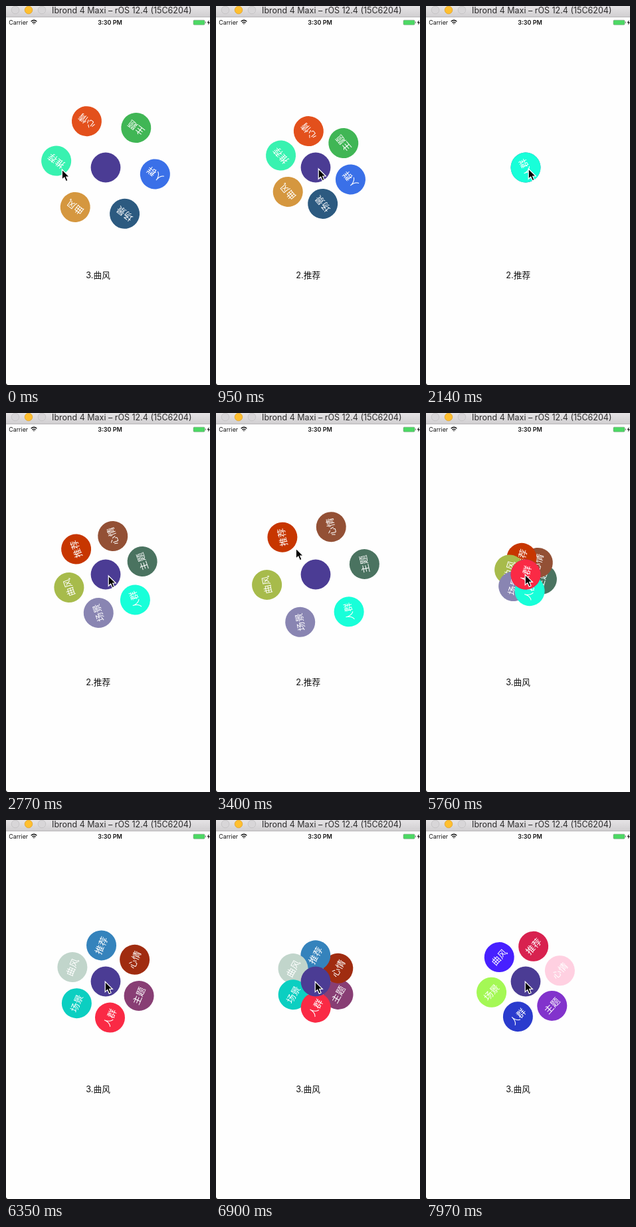
Write an HTML page that moves like this. It is 307 px wide and 568 px high and loops after 8000 ms.

```html
<!DOCTYPE html>
<html lang="zh">
<head>
<meta charset="utf-8">
<title>Orbit menu</title>
<style>
  html, body { margin: 0; width: 100%; height: 100%; overflow: hidden; background: #fefefe; }
  svg { display: block; width: 307px; height: 568px; }
  text { font-family: Inter, "Noto Sans CJK SC", "Noto Sans CJK", sans-serif; }
  .item text { font: 300 13.6px "Noto Sans CJK SC", "Noto Sans CJK", sans-serif; fill: #fff; text-anchor: middle; }
</style>
</head>
<body>
<svg viewBox="0 0 307 568">
  <defs>
    <linearGradient id="bar" x2="0" y2="1">
      <stop offset="0" stop-color="#e5e3e5"/>
      <stop offset="1" stop-color="#d1cfd1"/>
    </linearGradient>
  </defs>
  <rect width="307" height="568" fill="#fefefe"/>

  <rect width="307" height="16" fill="url(#bar)"/>
  <rect y="16" width="307" height="1" fill="#b9b7b9"/>
  <g fill="#d8d6d8" stroke="#c2c0c2" stroke-width=".8">
    <circle cx="14" cy="6" r="5.8"/>
    <circle cx="34" cy="6" r="5.8" fill="#ffbf2f" stroke="#e0a32c"/>
    <circle cx="54" cy="6" r="5.8"/>
  </g>
  <text x="174.3" y="11" font-size="12.5" text-anchor="middle" fill="#2c2b2c">Ibrond 4 Maxi – rOS 12.4 (15C6204)</text>

  <text x="4.3" y="28" font-size="8.8" fill="#111">Carrier</text>
  <g fill="none" stroke="#111" stroke-width="1.3">
    <path d="M37.6 23.2Q42 19.4 46.4 23.2M39.4 25.2Q42 23 44.6 25.2"/>
    <path d="M40.8 26.2L42 27.6 43.2 26.2Q42 25.3 40.8 26.2Z" fill="#111" stroke="none"/>
  </g>
  <text x="156.6" y="28" font-size="9" font-weight="600" text-anchor="middle" fill="#111">3:30 PM</text>
  <rect x="282" y="21.2" width="17" height="7" rx="1.2" fill="#4cd964" stroke="#7d8a7f" stroke-width=".5"/>
  <rect x="299.7" y="23.3" width="1.1" height="2.8" rx=".5" fill="#777"/>
  <path d="M305.6 21L302.6 25.2H304.6L303.9 28.4 307 24.2H305Z" fill="#111"/>

  <g transform="translate(150 242)">
    <circle id="hub" r="22.4" fill="#4b3c94"/>
  </g>
  <text id="label" x="120.3" y="408.3" font-size="12.7" fill="#111"></text>
  <path d="M0 565Q.3 567.6 2.6 568H0Z" fill="#111"/>
  <path id="cursor" d="M0 0V15.3L3.5 12.1 6 17.8 8.8 16.6 6.4 11H11.1Z" stroke="#fff" stroke-width="1.2"/>
</svg>
<script>
const LOOP = 8000, MOVE = 950, RADIUS = 75;
const NAMES = ['主题', '心情', '推荐', '曲风', '场景', '人群'];
const SETS = [
  { open: -2000, close: 615, colors: ['#40b655', '#e3501c', '#38f2b0', '#d5973f', '#2c5a80', '#3a70e8'] },
  { open: 2130, close: 5195, colors: ['#4a7360', '#935035', '#c73600', '#a7bb4b', '#8985b2', '#18ffd9'] },
  { open: 5745, close: 6438, colors: ['#883e74', '#a02c10', '#3583bc', '#c1d5cb', '#0bcfc1', '#fa2a45'] },
  { open: 7370, close: 9000, colors: ['#8233cc', '#ffd0e1', '#d8214f', '#4720ff', '#a4f855', '#2a3bcd'] }
];
// time, x, y of the pointer tip
const POINTER = [
  [0, 84.3, 245], [130, 84.3, 245], [520, 154.2, 244], [2950, 154.2, 244], [3400, 120.3, 203],
  [3900, 81.1, 237.3], [4850, 81.1, 237.3], [5130, 149.2, 242.3], [LOOP, 149.2, 242.3]
];

const byId = id => document.getElementById(id);
const hub = byId('hub'), label = byId('label'), cursor = byId('cursor');
const clamp = x => Math.min(1, Math.max(0, x));

function add(parent, tag, attrs) {
  const el = document.createElementNS('http://www.w3.org/2000/svg', tag);
  for (const key in attrs) el.setAttribute(key, attrs[key]);
  return parent.appendChild(el);
}

// cubic-bezier(.42, 0, .58, 1)
function easeInOut(x) {
  if (x <= 0 || x >= 1) return clamp(x);
  let lo = 0, hi = 1, s = .5;
  for (let i = 0; i < 20; i++) {
    s = (lo + hi) / 2;
    const at = 1.26 * (1 - s) ** 2 * s + 1.74 * (1 - s) * s * s + s ** 3;
    if (at < x) lo = s; else hi = s;
  }
  return s * s * (3 - 2 * s);
}

for (const set of SETS) {
  set.group = add(hub.parentNode, 'g', {});
  set.items = set.colors.map((fill, i) => {
    const item = add(set.group, 'g', { class: 'item' });
    add(item, 'circle', { r: 22.5, fill });
    add(item, 'text', { y: 5.1 }).textContent = NAMES[i];
    return item;
  });
}

function drawSet(set, t, turn) {
  const visible = t >= set.open && t < set.close + MOVE;
  set.group.style.display = visible ? '' : 'none';
  if (!visible) return;
  // opening sets lie above the hub, closing ones below it
  const closing = t >= set.close;
  if (set.closing !== closing) {
    set.closing = closing;
    if (closing) hub.before(set.group); else hub.after(set.group);
  }
  const spread = easeInOut((t - set.open) / MOVE) - easeInOut((t - set.close) / MOVE);
  const stacked = spread < .004;
  set.items.forEach((item, i) => {
    const angle = (turn + 90 - 60 * i) * Math.PI / 180;
    const x = RADIUS * spread * Math.cos(angle), y = RADIUS * spread * Math.sin(angle);
    item.setAttribute('transform', `translate(${x} ${y}) rotate(${turn})`);
    // covered items would only tint the rim of the top one
    item.style.display = stacked && i < NAMES.length - 1 ? 'none' : '';
  });
}

function drawPointer(t) {
  const next = POINTER.findIndex(p => p[0] > t);
  const [t0, x0, y0] = POINTER[next - 1], [t1, x1, y1] = POINTER[next];
  const k = easeInOut((t - t0) / (t1 - t0));
  cursor.setAttribute('transform', `translate(${x0 + (x1 - x0) * k} ${y0 + (y1 - y0) * k})`);
}

function draw(now) {
  const t = now % LOOP, turn = -142.4 + .0119 * t;
  for (const set of SETS) drawSet(set, t, turn);
  drawPointer(t);
  const picked = t >= 90 && t < 4400 ? 2 : 3;
  label.textContent = `${picked}.${NAMES[picked]}`;
}

const start = performance.now();
function tick() {
  draw(performance.now() - start);
  requestAnimationFrame(tick);
}
tick();
</script>
</body>
</html>
```
